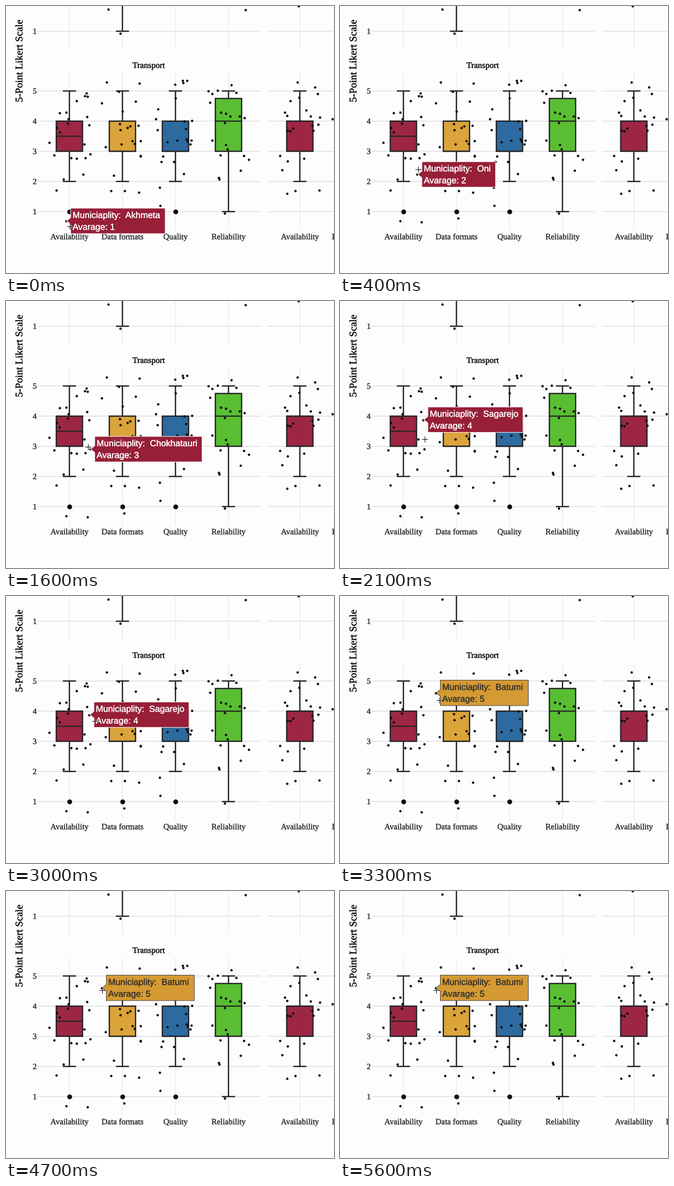
A matplotlib script that plays this animation: 600x487 px, repeating every 5.7 s.

```python
import numpy as np
import matplotlib.pyplot as plt
from matplotlib.animation import FuncAnimation
from matplotlib.patches import Polygon, Rectangle
from matplotlib.patheffects import withStroke

W, H, DPI = 600, 487, 100
PT = 72 / DPI
FRAMES, STEP = 57, 100

INK, GRID, FAINT = "#242426", "#e3e3e9", "#ececf1"
LABEL, TITLE = "#343436", "#0c0c0e"
CRIMSON, AMBER, BLUE, GREEN = "#9d2644", "#dba43a", "#2c6a9f", "#59be32"
SERIF, SANS = "Liberation Serif", "Liberation Sans"
CENTRES = [116, 213, 310, 407, 537.5]
NAMES = ["Availability", "Data formats", "Quality", "Reliability"]
SCORES = np.arange(1, 6)

rng = np.random.default_rng(12)
plt.rcParams.update({"text.hinting": "none", "path.snap": False})
fig = plt.figure(figsize=(W / DPI, H / DPI), dpi=DPI, facecolor="#fefdfe")
ax = fig.add_axes([0, 0, 1, 1])
ax.set_xlim(0, W)
ax.set_ylim(H, 0)
ax.axis("off")


def line(x0, y0, x1, y1, width=2.4, color=INK, z=3):
    return ax.plot([x0, x1], [y0, y1], color=color, lw=width * PT,
                   solid_capstyle="butt", zorder=z)[0]


def text(x, y, s, size, color=LABEL, font=SERIF, ha="center", z=5, **kw):
    label = ax.text(x, y, s, fontsize=size * PT, color=color, family=font,
                    ha=ha, va="baseline", zorder=z, clip_on=True, **kw)
    label.set_path_effects([withStroke(linewidth=0.3 * PT, foreground=color)])
    return label


def dots(xs, ys, radius=2.2):
    ax.scatter(xs, ys, s=(2 * radius * PT) ** 2, c="#0c0c0e", lw=0, zorder=4)


def level(score):
    return 430 - 55 * score


def box(x, color, answers):
    """Tukey box plot of the answers, centred on x."""
    q1, median, q3 = np.percentile(answers, [25, 50, 75])
    low = answers[answers >= q1 - 1.5 * (q3 - q1)].min()
    top, bottom = level(q3), level(q1)
    for end, edge in ((level(5), top), (level(low), bottom)):
        line(x, end, x, edge)
        line(x - 12, end, x + 12, end)
    ax.add_patch(Rectangle((x - 24, top), 48, bottom - top, fc=color, ec=INK,
                           lw=2.4 * PT, joinstyle="miter", zorder=3))
    line(x - 24, level(median), x + 24, level(median), 2.2)
    if low > answers.min():
        dots([x], [level(answers.min())], 4.4)


def jitter(x, answers, hovered):
    """Scatter the answers around their score, pinning the hovered ones."""
    xs = x + rng.uniform(-37, 37, answers.size)
    ys = level(answers) + rng.uniform(-22, 22, answers.size)
    for score, px, py in hovered:
        pick = np.flatnonzero(answers == score)[0]
        xs[pick], ys[pick] = px, py
    dots(xs, ys)


def tooltip(x, y, width, place, score, fill="#971f38", edge="white", ink="white"):
    """Hover label pointing left at (x, y)."""
    left, right, top, bottom = x + 8.5, x + 8.5 + width, y - 23.2, y + 23.2
    shape = Polygon([(x + 1, y), (left, y - 6), (left, top), (right, top),
                     (right, bottom), (left, bottom), (left, y + 6)],
                    fc=fill, ec=edge, lw=PT, joinstyle="miter", zorder=6)
    ax.add_patch(shape)
    rows = (f"Municiaplity:  {place}", f"Avarage: {score}")
    return [shape] + [text(left + 3.5, y - 5.3 + 21.5 * i, row, 16.1, ink, SANS, "left", 7)
                      for i, row in enumerate(rows)]


# Grid of both panel columns, with the foot of the row above
for left, right in ((58, 466), (479, W)):
    for y in [46, *level(SCORES)]:
        line(left, y, right, y, 1.8, GRID, 1)
for x in CENTRES:
    line(x, 0, x, 80, 1.6, FAINT, 1)
    line(x, 121, x, 409, 1.6, FAINT, 1)
line(213, 0, 213, 46)
line(201, 46, 225, 46)
dots([187, 209, 438, 535, 597], [6, 49.5, 7, 0, 205.5])

# Labels
text(52.5, 51, "1", 14.8)
for s in SCORES:
    text(52.5, level(s) + 5, str(s), 14.8)
for x, name in zip(CENTRES + [634.5], NAMES + NAMES[:2]):
    text(x, 425.5, name, 14.8)
text(261, 113, "Transport", 15.4, TITLE)
text(30, 100.5, "5-Point Likert Scale", 18.7, TITLE,
     rotation=90, rotation_mode="anchor")

# Hovered answers: column, score, position, label width, place, start and end frame
HOVERS = [
    (0, 1, 109.7, 392, 173, "Akhmeta", 0, 2),
    (0, 2, 141.3, 307.2, 134.8, "Oni", 3, 6),
    (0, 3, 153.7, 270.2, 196.5, "Chokhatauri", 7, 18),
    (0, 4, 152.3, 216.5, 174, "Sagarejo", 19, 31),
    (1, 5, 175, 176.7, 161, "Batumi", 32, FRAMES),
]

# How many answers gave each score from 1 to 5
COUNTS = [(2, 3, 7, 8, 4), (1, 4, 7, 6, 5), (1, 2, 9, 6, 5),
          (1, 3, 6, 6, 6), (0, 4, 3, 11, 5)]
COLORS = [CRIMSON, AMBER, BLUE, GREEN, CRIMSON]
for col, (x, color, counts) in enumerate(zip(CENTRES, COLORS, COUNTS)):
    answers = np.repeat(SCORES, counts)
    box(x, color, answers)
    jitter(x, answers, [h[1:4] for h in HOVERS if h[0] == col])

tips = []
for col, score, x, y, width, place, start, end in HOVERS:
    style = ("#d59a33", "#444444", "#38342c") if col else ()
    tips.append((start, end, tooltip(x, y, width, place, score, *style)))

# Cursor stops: frame, x, y
PATH = [(0, 117, 402), (4, 143, 298), (7, 150, 272), (16, 150, 266),
        (30, 163, 228), (33, 182, 190), (36, 176, 181)]
stop_t, stop_x, stop_y = zip(*PATH)
cursor = [line(0, 0, 0, 0, w, c, z)
          for w, c, z in ((2.4, "#ffffff90", 8), (1.1, "#18181a", 9)) for _ in "hv"]


def update(frame):
    for start, end, parts in tips:
        for part in parts:
            part.set_visible(start <= frame < end)
    x = round(np.interp(frame, stop_t, stop_x)) + 0.5
    y = round(np.interp(frame, stop_t, stop_y)) + 0.5
    for i, arm in enumerate(cursor):
        if i % 2:
            arm.set_data([x, x], [y - 5.5, y + 5.5])
        else:
            arm.set_data([x - 5.5, x + 5.5], [y, y])
    return cursor


anim = FuncAnimation(fig, update, frames=FRAMES, interval=STEP,
                     repeat=True, repeat_delay=0, blit=False)
plt.show()
```
